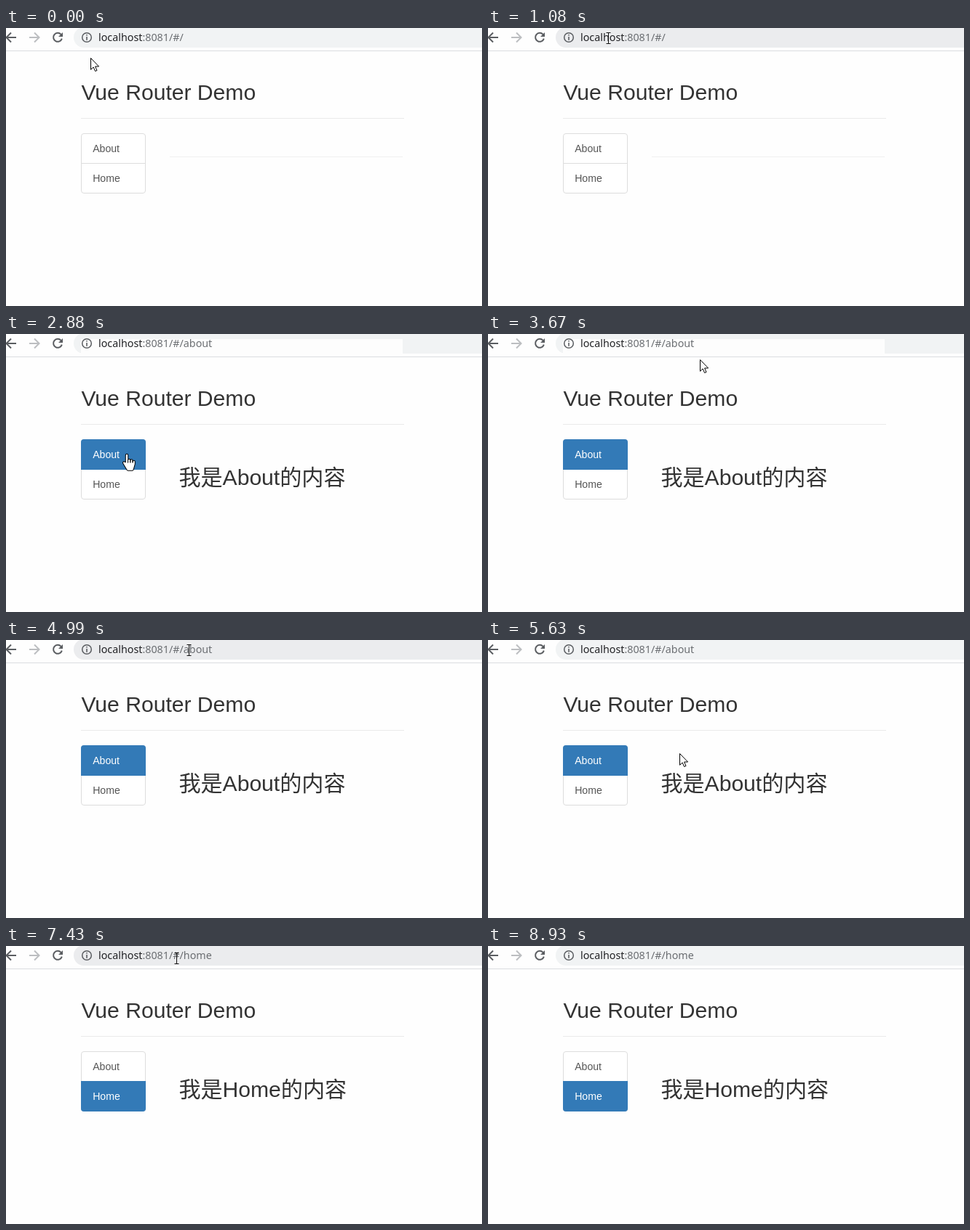
An HTML page that plays this animation: 654x383 px, repeating every 9.18 s.

```html
<!DOCTYPE html>
<html lang="en">
<head>
<meta charset="utf-8">
<title>Vue Router Demo</title>
<style>
  html, body { margin: 0; width: 100%; height: 100%; overflow: hidden; background: #fefefe; }
  svg { display: block; width: 654px; height: 383px; }
  text { font-family: "Liberation Sans", "Noto Sans CJK SC", "Noto Sans CJK", sans-serif; white-space: pre; }
  .title { font-size: 30.1px; fill: #333; }
  .item { font-size: 14.1px; fill: #555; }
  .url { font: 14.3px "Noto Sans", "Open Sans", sans-serif; fill: #6b6e72; }
  .host { fill: #202124; }
  .icon { fill: none; stroke: #5a5d61; stroke-width: 2; }
  .off { display: none; }
</style>
</head>
<body>
<svg viewBox="0 0 654 383">
  <defs>
    <clipPath id="listShape"><rect x="103" y="145" width="89" height="83" rx="4"/></clipPath>
    <path id="handShape" d="M0 2V14M3.2 9V14M6.4 9.5V14M9.6 11V14M-3.8 12.5L1.5 21.5H7.5L9.6 14H0Z"
      stroke-linecap="round" stroke-linejoin="round"/>
  </defs>
  <rect width="654" height="383" fill="#fefefe"/>

  <rect id="bar" x="93" y="-1" width="600" height="28" rx="14"/>
  <rect id="flash" x="103" y="7" height="20" fill="#fdfdfd"/>
  <path d="M0 31.5H654" stroke="#dadce0"/>
  <path class="icon" d="M14 13H1M7 6.5L.5 13L7 19.5"/>
  <path class="icon" d="M32 13H45M39 6.5L45.5 13L39 19.5" style="stroke:#bcbec1"/>
  <path class="icon" d="M75.6 8.8A6 6 0 1 0 76.8 14.6"/>
  <path d="M78 6V12H72Z" fill="#5a5d61"/>
  <circle class="icon" cx="111" cy="13" r="6.3" style="stroke-width:1.5"/>
  <path d="M111 9V10.6M111 12V16.8" stroke="#5a5d61" stroke-width="1.6"/>
  <text class="url" x="127" y="18"><tspan class="host">localhost</tspan><tspan id="path"></tspan></text>

  <text class="title" x="103.4" y="99">Vue Router Demo</text>
  <path d="M103 124.5H547" stroke="#eaeaea"/>
  <path id="emptyRule" d="M225 177.5H545" stroke="#f0f0f0"/>
  <text class="title" id="content" x="237.4" y="208"></text>

  <rect x="103.5" y="145.5" width="88" height="82" rx="3.5" fill="#fff" stroke="#ddd"/>
  <path d="M103 186.5H192" stroke="#ddd"/>
  <g clip-path="url(#listShape)">
    <rect id="aboutFill" x="103" y="145" width="89" height="42"/>
    <rect id="homeFill" x="103" y="186" width="89" height="42"/>
  </g>
  <text class="item" id="aboutText" x="119.2" y="171">About</text>
  <text class="item" id="homeText" x="119.2" y="212">Home</text>

  <g id="cursor">
    <path id="arrow" d="M.5 .5V16.3L4.1 12.9L6.6 18.5L9 17.5L6.6 12H11.6Z" fill="#fff" stroke="#000"/>
    <path id="beam" d="M-3.5 -7.5H2.5M-.5 -7V7M-3.5 7.5H2.5" fill="none" stroke="#111"/>
    <g id="hand">
      <use href="#handShape" stroke="#000" stroke-width="4.4"/>
      <use href="#handShape" fill="#fff" stroke="#fff" stroke-width="2.4"/>
      <path d="M1.6 8V12M4.8 8V12M8 9V12" stroke="#000"/>
    </g>
  </g>
</svg>
<script>
const LOOP = 9180, TICK = 60, ABOUT_CLICK = 2880, HOME_CLICK = 5920, EXIT = 8930;
const $ = id => document.getElementById(id);

const easeIn = power => f => f ** power;
const easeOut = power => f => 1 - (1 - f) ** power;

// The pointer rests between moves; bow bends a move sideways.
const home = { x: 116, y: 41 };
const moves = [
  { start: 370, end: 660, x: 132, y: 13, ease: easeOut(2) },
  { start: 840, end: 1490, x: 260, y: 15, ease: easeIn(1.5) },
  { start: 1920, end: 2510, x: 166, y: 165, ease: easeOut(1.8), bow: 16 },
  { start: 3310, end: 4380, x: 251, y: 13, ease: easeOut(4.2), bow: 118 },
  { start: 4990, end: 5690, x: 163, y: 213, ease: easeIn(2), bow: 96 },
  { start: 6230, end: 7130, x: 253, y: 17, ease: easeIn(1.1), bow: 67 },
  { start: 7190, end: 7430, x: 235, y: 17, ease: easeOut(1) },
  { start: 7920, end: EXIT, x: 612, y: 383, ease: easeOut(1.6) }
];

function pointerAt(t) {
  let { x, y } = home;
  for (const { start, end, ease, bow = 0, ...to } of moves) {
    if (t < start) break;
    const steps = Math.round((end - start) / TICK) + 1;
    const step = Math.floor((t - start) / TICK + 0.2) + 1;
    const f = ease(Math.min(1, step / steps));
    x += (to.x - x) * f + bow * Math.sin(Math.PI * f);
    y += (to.y - y) * f;
  }
  return [Math.round(x), Math.round(y)];
}

const show = (id, on) => $(id).classList.toggle("off", !on);

function paintItem(name, active, hover) {
  $(name + "Fill").setAttribute("fill", active ? "#337ab7" : hover ? "#f5f5f5" : "none");
  $(name + "Text").style.fill = active ? "#fff" : "#555";
}

function render(t) {
  const [x, y] = pointerAt(t);
  const within = (left, top, right, bottom) => x >= left && x < right && y >= top && y < bottom;
  const page = t < ABOUT_CLICK ? "" : t < HOME_CLICK ? "about" : "home";
  const label = page && page[0].toUpperCase() + page.slice(1);

  const overBar = y < 28;
  const overAbout = within(103, 145, 192, 187), overHome = within(103, 187, 192, 228);
  const overText = within(103, 72, 342, 105) || page && within(237, 181, 468, 214);
  const kind = overAbout || overHome ? "hand" : overBar || overText ? "beam" : "arrow";

  $("bar").setAttribute("fill", overBar ? "#ebecee" : "#f1f3f4");
  const sinceClick = t - (page === "home" ? HOME_CLICK : ABOUT_CLICK);
  show("flash", sinceClick >= 0 && sinceClick < 1200 && !overBar);
  $("flash").setAttribute("width", page === "home" ? 365 : 442);

  $("path").textContent = ":8081/#/" + page;
  $("content").textContent = page && `我是${label}的内容`;
  show("emptyRule", !page);
  paintItem("about", page === "about", overAbout);
  paintItem("home", page === "home", overHome);

  for (const shape of ["arrow", "beam", "hand"]) show(shape, shape === kind);
  show("cursor", t < EXIT);
  $("cursor").setAttribute("transform", `translate(${x} ${y})`);
}

function tick() {
  render(performance.now() % LOOP);
  requestAnimationFrame(tick);
}
tick();
</script>
</body>
</html>
```
